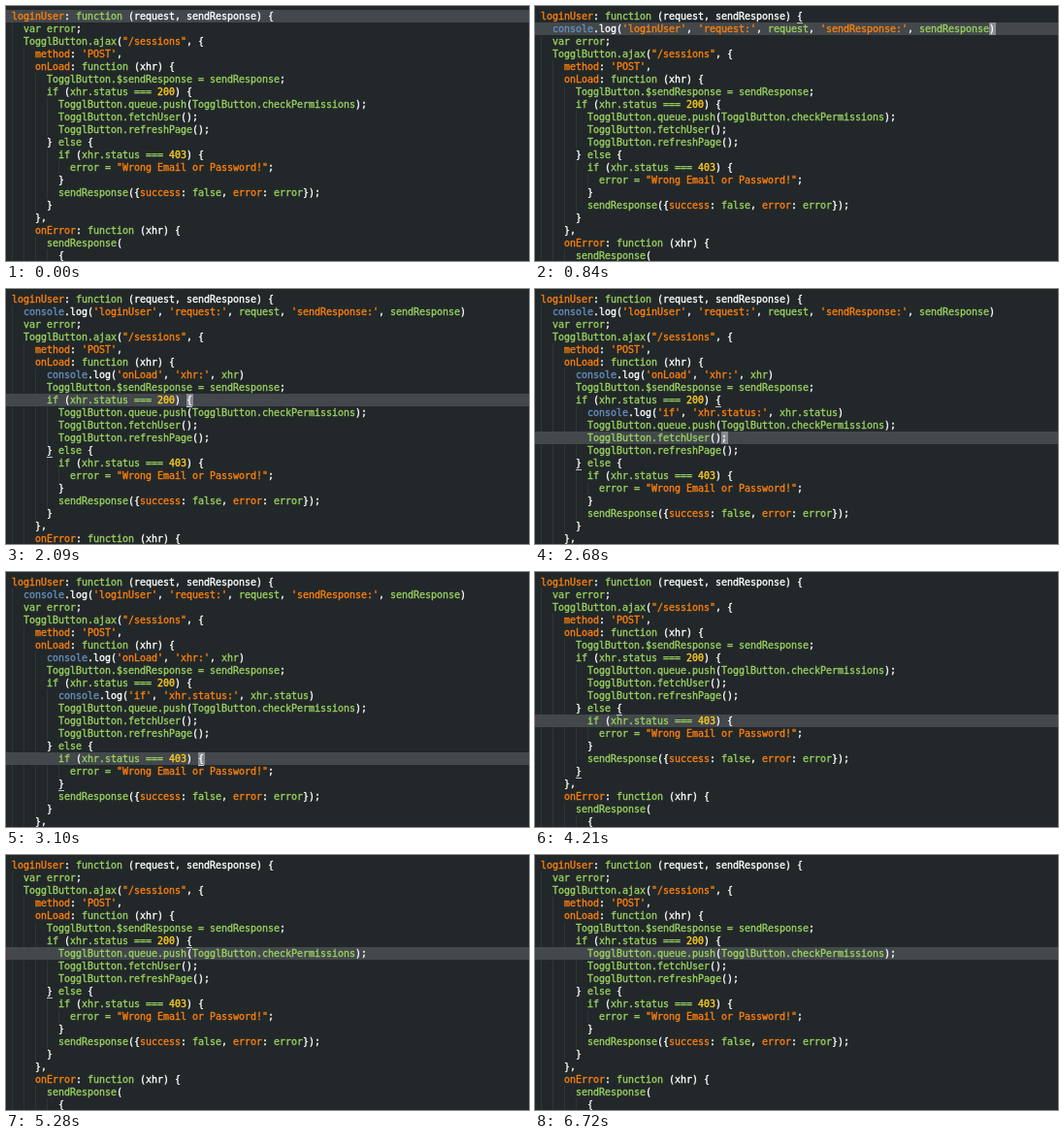
Animation of 539 by 263 pixels, one loop 6.82 s. Source, as an HTML page with a canvas:

```html
<!DOCTYPE html>
<html lang="en">
<head>
<meta charset="utf-8">
<title>Log insertion in a code editor</title>
<style>
  html, body { margin: 0; width: 100%; height: 100%; overflow: hidden; background: #22282a; }
  canvas { display: block; width: 539px; height: 263px; }
</style>
</head>
<body>
<canvas id="stage" width="539" height="263"></canvas>
<script>
const ctx = document.getElementById('stage').getContext('2d');
const LOOP = 6820, LEFT = 6, TOP = 4, CHAR = 6, ROW = 13;
const COLORS = {
  back: '#22282a', active: '#43484c', guide: '#303638', edge: '#693941',
  caret: 'rgba(225, 230, 235, 0.42)', bracket: '#c5c9cb',
  plain: '#ffffff', word: '#9ad15e', text: '#ff7f0a', number: '#ffcd22', call: '#678fbd'
};

const source = `loginUser: function (request, sendResponse) {
  var error;
  TogglButton.ajax("/sessions", {
    method: 'POST',
    onLoad: function (xhr) {
      TogglButton.$sendResponse = sendResponse;
      if (xhr.status === 200) {
        TogglButton.queue.push(TogglButton.checkPermissions);
        TogglButton.fetchUser();
        TogglButton.refreshPage();
      } else {
        if (xhr.status === 403) {
          error = "Wrong Email or Password!";
        }
        sendResponse({success: false, error: error});
      }
    },
    onError: function (xhr) {
      sendResponse(
        {`.split('\n');

// Each log line goes in at a row of the already edited text.
const logs = [
  [1, "  console.log('loginUser', 'request:', request, 'sendResponse:', sendResponse)"],
  [6, "      console.log('onLoad', 'xhr:', xhr)"],
  [9, "        console.log('if', 'xhr.status:', xhr.status)"],
  [14, "        console.log('if', 'xhr.status:', xhr.status)"]
];
const versions = [source];
for (const [row, line] of logs) {
  const next = versions[versions.length - 1].slice();
  next.splice(row, 0, line);
  versions.push(next);
}

// start, log count, active row, caret place, row of opening and closing bracket
const cues = [
  [0, 0, 0, 'edge'],
  [840, 1, 1, 'end', 0],
  [1020, 1, 2, 'end', 0],
  [1200, 1, 3, 'end', 3],
  [1320, 1, 4, 'end', 3],
  [1500, 1, 5, 'end', 5, 17],
  [1680, 2, 6, 'end', 5, 18],
  [1970, 2, 7, 'end', 5, 18],
  [2090, 2, 8, 'end', 8, 12],
  [2380, 3, 9, 'end', 8, 13],
  [2560, 3, 10, 'end', 8, 13],
  [2680, 3, 11, 'end', 8, 13],
  [2860, 3, 12, 'end', 8, 13],
  [2980, 3, 13, 'end', 13, 18],
  [3100, 3, 14, 'end', 14, 16],
  [3400, 4, 14, 'end', 13, 19],
  [4210, 0, 11, 'edge', 10, 15],
  [4870, 0, 10, 'edge', 6, 10],
  [5050, 0, 9, 'edge', 6, 10],
  [5165, 0, 8, 'edge', 6, 10],
  [5280, 0, 7, 'edge', 6, 10],
  [6720, 0, 7, 'none']
];

// Property keys, strings, numbers, console, parameters and log, words, punctuation.
const token = /(\w+(?=:))|("[^"]*"|'[^']*')|(\b\d+\b)|(console)|((?<=function \([\w, ]*)\w+|\.log\b)|([\w$.=]+)|([^\s\w$.="']+)/g;
const kinds = ['text', 'text', 'number', 'call', 'plain', 'word', 'plain'];

const xAt = col => LEFT + col * CHAR;
const yAt = row => TOP + row * ROW;
const indentOf = line => line.search(/\S/);

function box(color, x, y, w, h) {
  ctx.fillStyle = color;
  ctx.fillRect(x, y, w, h);
}

function underline(row, col) {
  box(COLORS.bracket, xAt(col), yAt(row) + ROW, CHAR, 1);
}

function drawGuides(line, row) {
  for (let col = 0; col < indentOf(line); col += 2) {
    box(COLORS.guide, xAt(col), yAt(row), 1, ROW);
  }
}

function drawLine(line, row) {
  for (const match of line.matchAll(token)) {
    const kind = kinds[match.slice(1).findIndex(part => part !== undefined)];
    ctx.fillStyle = ctx.strokeStyle = COLORS[kind];
    ctx.fillText(match[0], xAt(match.index), yAt(row) + 10);
    ctx.strokeText(match[0], xAt(match.index), yAt(row) + 10);
  }
}

function draw(time) {
  const [, count, active, caret, open, close] = cues.findLast(cue => cue[0] <= time);
  const lines = versions[count];
  box(COLORS.back, 0, 0, 539, 263);
  lines.forEach(drawGuides);
  box(COLORS.active, 0, yAt(active), 539, ROW);
  if (caret === 'edge') box(COLORS.edge, 0, yAt(active), 1, ROW);
  if (caret === 'end') {
    box(COLORS.caret, xAt(lines[active].length - 1), yAt(active), CHAR + 1, ROW);
  }
  // A hairline stroke gives the glyphs their slightly heavy weight.
  ctx.font = '9.97px "DejaVu Sans Mono", monospace';
  ctx.lineWidth = 0.35;
  ctx.lineJoin = 'round';
  lines.forEach(drawLine);
  if (open !== undefined) underline(open, lines[open].length - 1);
  if (close !== undefined) underline(close, indentOf(lines[close]));
}

const start = performance.now();
function tick() {
  draw((performance.now() - start) % LOOP);
  requestAnimationFrame(tick);
}
tick();
</script>
</body>
</html>
```
